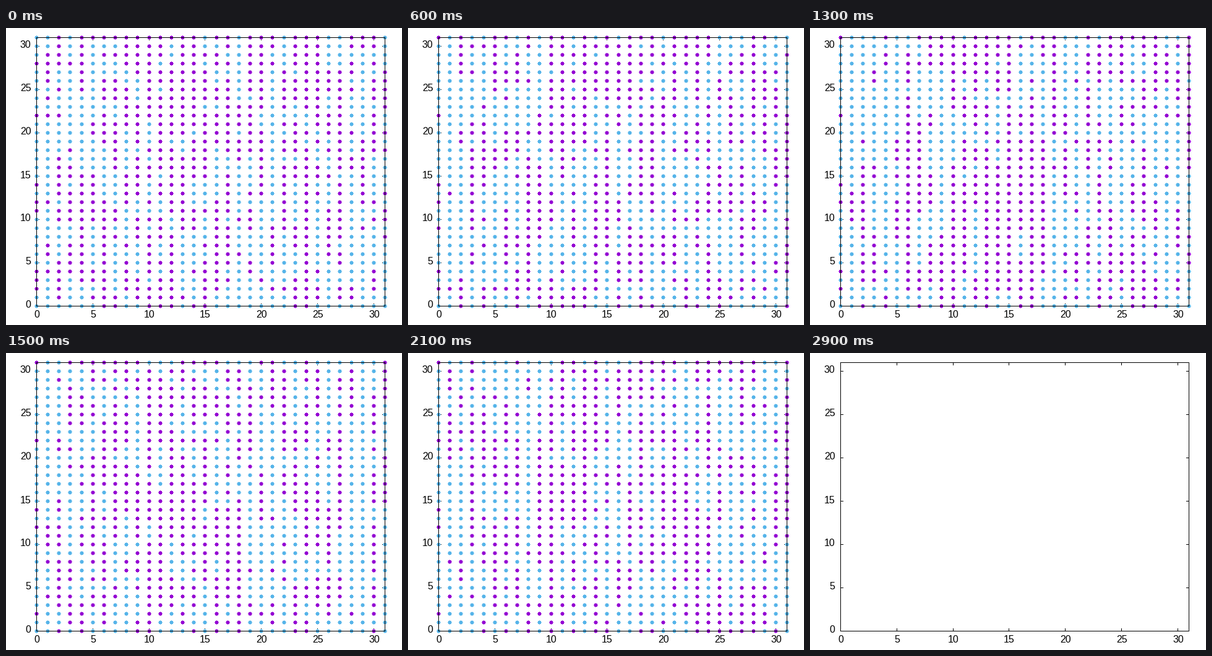
Recreate the animation shown at these times as a matplotlib script. Size 640 by 480 pixels, loop 3000 ms.

```python
import numpy as np
import matplotlib.pyplot as plt
from matplotlib.animation import FuncAnimation

W, H, DPI = 640, 480, 100
N = 32                                   # lattice sites per side
FRAMES, INTERVAL = 30, 100
LEFT, RIGHT, TOP, BOTTOM = 49, 612, 15, 449
UP, DOWN = (148, 0, 211), (86, 180, 233)
TICKS = range(0, N, 5)
PINNED = [2, 12, 14, 22]                 # sites of the first column that stay up


def px(x):
    return round(LEFT + (RIGHT - LEFT) * x / (N - 1))


def py(y):
    return round(BOTTOM - (BOTTOM - TOP) * y / (N - 1))


def chain(noise, rho):
    """Correlate unit noise along its first axis, keeping unit variance."""
    out = noise.copy()
    for i in range(1, len(out)):
        out[i] = rho * out[i - 1] + np.sqrt(1 - rho ** 2) * noise[i]
    return out


def make_spins():
    rng = np.random.default_rng(7)
    noise = rng.standard_normal((N, FRAMES - 1, N))        # y, time, x
    field = chain(noise, 0.65).transpose(1, 0, 2)          # time, y, x
    x = np.arange(N)
    field = chain(field, 0.6 + 0.37 * np.exp(-x / 0.8))
    bias = np.interp(x, [0, 2, 5, 11, 14, 17, 19, 23, 26, 31],
                     [-1.2, -0.4, 0.1, 0.25, 0.4, 0.1, -0.05, 0.2, 0, -0.2])
    t = np.arange(FRAMES - 1)
    surge = 0.35 * np.exp(-((t - 18) / 2) ** 2)
    spins = field + bias + surge[:, None, None] > 0
    spins[:, PINNED, 0] = True
    spins[:, N - 1, 0] = t > 2
    return spins


def draw_ticks(img):
    for v in TICKS:
        x, y = px(v), py(v)
        img[BOTTOM - 4:BOTTOM + 1, x] = img[TOP:TOP + 5, x] = 0
        img[y, LEFT:LEFT + 5] = img[y, RIGHT - 4:RIGHT + 1] = 0


def draw_border(img):
    img[[TOP, BOTTOM], LEFT:RIGHT + 1] = 0
    img[TOP:BOTTOM + 1, [LEFT, RIGHT]] = 0


def render(n):
    img = np.full((H, W, 3), 255, np.uint8)
    draw_ticks(img)
    if n < len(spins):
        for y in range(N):
            for x in range(N):
                cy, cx = py(y), px(x)
                cell = img[cy - 3:cy + 4, cx - 3:cx + 4]
                cell[MARKER] = UP if spins[n, y, x] else DOWN
    draw_border(img)
    return img


def label(x, y, value, ha):
    fig.text(x / W, 1 - y / H, str(value), ha=ha, va="baseline",
             family="Liberation Sans", fontsize=16 * 72 / DPI)


# Solid block with a one-pixel tip on each side
dy, dx = abs(np.mgrid[-3:4, -3:4])
MARKER = (np.maximum(dx, dy) < 3) | (dx == 0) | (dy == 0)
spins = make_spins()

fig = plt.figure(figsize=(W / DPI, H / DPI), dpi=DPI, facecolor="white")
picture = fig.figimage(render(0), origin="upper")
for v in TICKS:
    label(px(v) + 1, 468.5, v, "center")
    label(40.5, py(v) + 3.5, v, "right")


def update(n):
    picture.set_data(render(n))
    return [picture]


anim = FuncAnimation(fig, update, frames=FRAMES, interval=INTERVAL,
                     repeat=True, repeat_delay=0)
plt.show()
```
